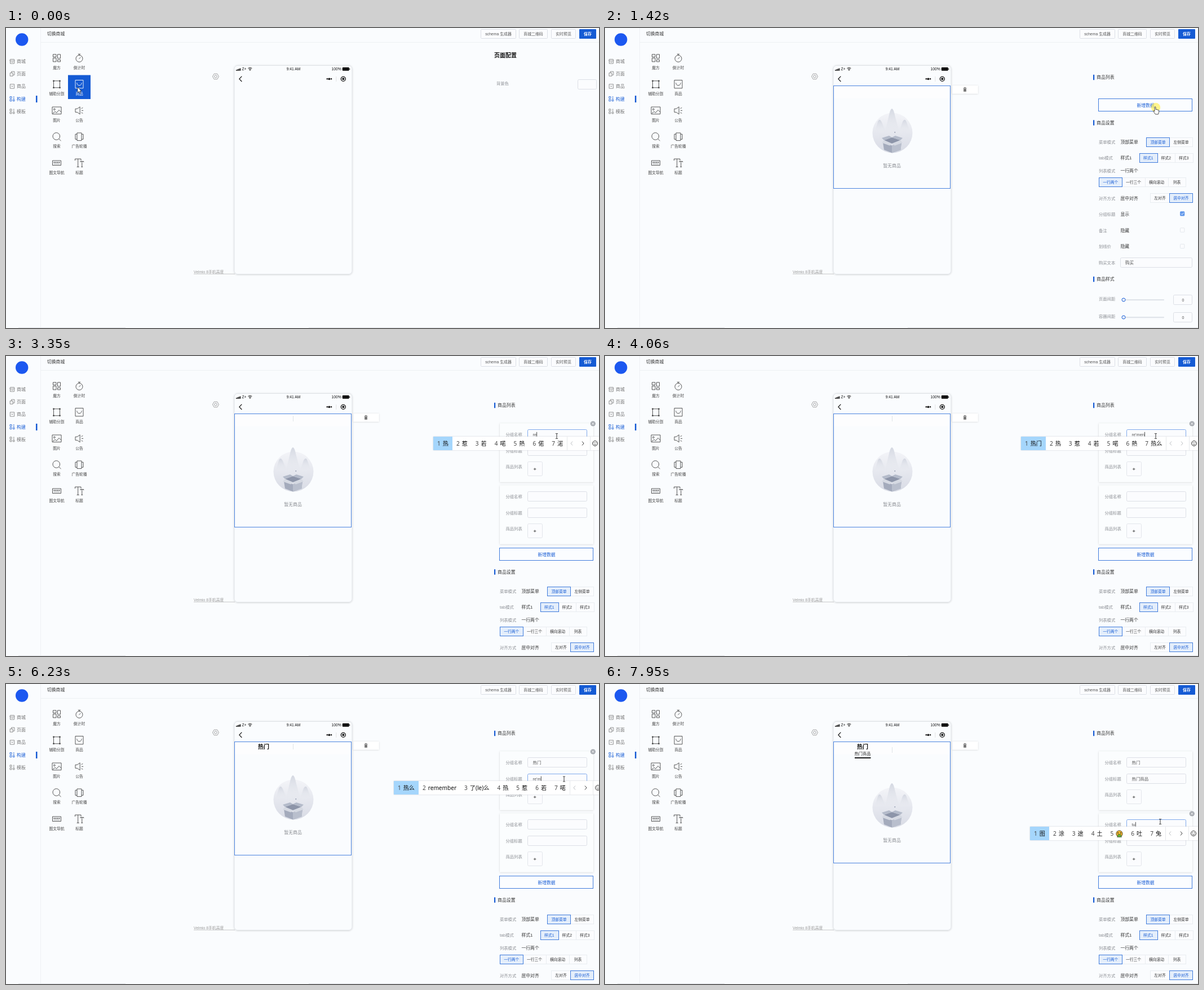
An HTML page that plays this animation: 1052 px wide and 532 px high, repeating every 8 s.

```html
<!DOCTYPE html>
<html lang="zh-CN">
<head>
<meta charset="utf-8">
<style>
html, body { margin: 0; width: 100%; height: 100%; overflow: hidden; background: #fafcfe; }
body { position: relative; font-family: "Liberation Sans", "Noto Sans CJK SC", "Noto Sans CJK", sans-serif; }
#stage { position: absolute; left: 0; top: 0; display: block; }
#ime { position: absolute; display: flex; height: 24px; background: #fff; font-size: 10.1px; line-height: 24px; overflow: hidden;
  white-space: pre; color: #111; box-shadow: 0 0 2px #c4c8ce; font-family: "Noto Sans", "Noto Sans CJK SC", "Noto Sans CJK", sans-serif; }
#ime span { padding: 0 7px; flex: none; }
#ime span:first-child { background: #a5d6fc; }
#ime i { font-style: normal; color: #444; margin-right: 4px; }
#ime svg { flex: none; display: block; }
#ime .face { display: inline-block; vertical-align: -2.5px; }
</style>
</head>
<body>
<svg id="stage" width="1052" height="532" viewBox="0 0 1052 532"></svg>
<div id="ime"></div>
<script>
const LOOP = 8000, BLUE = '#155bd4', DARK = '#333', GREY = '#8c8f94', EDGE = '#dcdfe6';

// y is the vertical middle of the glyphs
const text = (x, y, s, size = 7.3, fill = DARK, extra = '') =>
  `<text x="${x}" y="${y + size * .37}" font-size="${size}" fill="${fill}" ${extra}>${s}</text>`;
const mid = (x, y, s, size, fill, extra = '') => text(x, y, s, size, fill, 'text-anchor="middle" ' + extra);
const box = (x, y, w, h, fill = 'none', stroke = 'none', extra = '') =>
  `<rect x="${x}" y="${y}" width="${w}" height="${h}" fill="${fill}" stroke="${stroke}" ${extra}/>`;
const path = (d, stroke = '#444', w = .9, fill = 'none', extra = '') =>
  `<path d="${d}" stroke="${stroke}" stroke-width="${w}" fill="${fill}" ${extra}/>`;
const dot = (x, y, r, fill, extra = '') => `<circle cx="${x}" cy="${y}" r="${r}" fill="${fill}" ${extra}/>`;
const group = (id, body, extra = '') => `<g id="${id}" ${extra}>${body}</g>`;
const at = (x, y, body) => `<g transform="translate(${x} ${y})">${body}</g>`;
const snap = v => Math.round(v - .5) + .5;

function header() {
  const buttons = [[842, 63, 'schema 生成器'], [910, 51, '商城二维码'], [967, 44, '实时预览']];
  return path('M61.5 0V532M62 25.5H1052', '#eef1f4', 1) + path('M22 531.5H212M537 531.5H1052', '#e2e5e9', 1) +
    dot(28.2, 20.5, 11.2, '#1c58f0') + text(73, 10.5, '切换商城', 7.8) +
    buttons.map(([x, w, s]) => box(x + .5, 2.5, w - 1, 16, '#fbfcfe', EDGE, 'rx="1"') + mid(x + w / 2, 10.5, s, 6.9, '#555')).join('') +
    box(1017, 2, 30, 17, BLUE, 'none', 'rx="1"') + mid(1032, 10.5, '保存', 6.9, '#fff', 'font-weight="bold"');
}

function sidebar() {
  const tiles = 'M-4-4h3v3h-3zM-4 1h3v3h-3zM1.5-3.5H4M1.5-1H4M1.5 1.2H4V4H1.5z';
  const icons = ['M-3.5-3.5h7l.7 2.6h-8.4zM-3.5-1V4h7V-1M-1.5 1.5h3', 'M-3.8-1.5h5V4h-5zM-1.5-1.5V-4H4V2H1.2',
    'M-3.7-3.7h7.4v7.4h-7.4zM-1.8-1q1.8 3 3.6 0', tiles, tiles];
  return ['商城', '页面', '商品', '构建', '模板'].map((s, i) => {
    const y = 59 + i * 22.2, c = i === 3 ? BLUE : '#777';
    return at(11, y, path(icons[i], c, .8)) + text(19, y, s, 8, c);
  }).join('') + box(53, 120, 2.5, 12, BLUE);
}

const corners = [-5.5, 5.5].flatMap(x => [-6, 6].map(y => box(x - 1.2, y - 1.2, 2.4, 2.4, 'currentColor'))).join('');
const modules = [
  ['魔方', 'M-6.5-6.5h5.5v4.5h-5.5zM1.5-6.5h5v7h-5zM-6.5 0h5.5v6.5h-5.5zM1.5 3h5v3.5h-5z'],
  ['倒计时', 'M-6 1a6 6 0 1 0 12 0a6 6 0 1 0-12 0M0-5V-7M-2.2-7h4.4M-.5 1.5l3-3'],
  ['辅助分割', 'M-5.5-6h11v12h-11z', corners],
  ['商品', 'M-7-7.3H7V7H-7zM-4.2-2.5q.5 4.5 4.2 4.5t4.2-4.5'],
  ['图片', 'M-8-6.3H8V6.3H-8zM-5.5-2a1.4 1.4 0 1 0 2.8 0a1.4 1.4 0 1 0-2.8 0M-7 5l4-3 3 2 4-5 4 4'],
  ['公告', 'M-7-3h3.2l5-3.5v13l-5-3.5H-7zM4 0h3.2M3.7-3.5l2.6-1.5M3.7 3.5l2.6 1.5'],
  ['搜索', 'M-7-.8a6.3 6.3 0 1 0 12.6 0a6.3 6.3 0 1 0-12.6 0M4 4l3.5 3.3'],
  ['广告轮播', 'M-4-6.8h8V6.8h-8zM-4-4.5h-3v9h3M4-4.5h3v9h-3'],
  ['图文导航', 'M-7.5-4.2H7.5V4.2H-7.5z', [-4.5, -1.5, 1.5, 4.5].map(x => dot(x, -1, 1.1, 'currentColor')).join('') +
    path('M-5.5 1.8h11', 'currentColor', .5)],
  ['标题', 'M-7.5-4.2v-3h10.5v3M-2.3-7v14M-4.4 7h4.2M2-1.2v-1.6h5.7v1.6M4.8-2.8V7M3.3 7h3']
];
const module = i => {
  const [name, d, more = ''] = modules[i], x = 90 + i % 2 * 40, y = 53.3 + (i >> 1) * 46.5;
  return at(x, y, path(d, 'currentColor', .9) + more) + mid(x, y + 16.8, name, 6.8, 'currentColor');
};

function phone() {
  const bars = [0, 1, 2, 3].map(i => box(408 + i * 2.2, 74.2 - i * .9, 1.7, 1.6 + i * .9, '#111')).join('');
  return at(372, 86, path('M-5.5 0l2.7-4.8h5.6L5.5 0 2.8 4.8h-5.6z', '#999') + dot(0, 0, 2.3, 'none', 'stroke="#999" stroke-width=".9"')) +
    text(333, 432, 'Velmio 8手机高度', 6.8, '#999') + path('M333 436.2H406', '#bbb', .8) +
    box(405, 66.5, 209, 370, '#fafcfe', '#dfe3e7', 'rx="6" filter="url(#soft)"') +
    bars + text(418.5, 72.8, 'Z+', 6.7, '#111') +
    path('M429.6 71.6q3.3-2.8 6.6 0M430.9 73.3q2-1.7 4 0', '#111', 1.1) + dot(432.9, 74.8, .9, '#111') +
    mid(510, 72.8, '9:41 AM', 6.7, '#111') + text(577.5, 72.8, '100%', 6.7, '#111') +
    box(597, 70, 11.5, 5.5, '#111', '#111', 'rx="1" stroke-width=".6"') + box(609.2, 71.7, 1, 2.2, '#111') +
    path('M418.3 85.6l-4.4 4.7 4.4 4.7', '#111', 1.2) +
    dot(569.8, 90.3, 1.2, '#111') + dot(573.3, 90.3, 1.9, '#111') + dot(577, 90.3, 1.2, '#111') +
    path('M585.8 86V95', '#ddd', .8) + dot(598.3, 90.3, 4, 'none', 'stroke="#111" stroke-width="1.3"') + dot(598.3, 90.3, 2, '#111');
}

// a pale disc with three fading peaks and an open carton
function empty() {
  return dot(510, 186, 35.5, 'url(#disc)') +
    path('M478 186l6-20q3-7 7 1l8 19zM521 186l7-20q4-7 7 1l7 19z', 'none', 0, 'url(#hill)') +
    path('M495 192l8-34q6-30 12 0l9 34z', 'none', 0, 'url(#hill)') +
    path('M493 203l16 5.5v13l-14-5.5zM509 208.5l17-5.5-1.5 13-15.5 5.5z', 'none', 0, '#a4abbc') +
    path('M509 208.5l16-5v12.5l-16 5.5z', 'none', 0, '#b9bfcd') +
    path('M495 199l14-5 15 5-15 6z', 'none', 0, '#8d95a9') +
    path('M495 199l-4 4.5 14 5 4-3.5zM524 199l4 4.5-14 5-5-3.5z', 'none', 0, '#d5d9e2') +
    path('M495 199l-4-4 13-4 5 3zM524 199l4-4-13-4-6 3z', 'none', 0, '#b4bbca') + dot(514.3, 185, .9, '#8d96aa') +
    mid(509, 244, '暂无商品', 7.9, '#888b90');
}

const component = () =>
  box(406, 103, 207, 22, '#fff', 'none', 'opacity=".6"') + group('empty', empty()) +
  box(405.5, 102.5, 207, 182, 'none', '#4a82de', 'id="frame"') +
  path('M509.5 106V116', '#d9dce1', .8, 'none', 'id="split"') +
  group('hot', mid(457, 110.8, '热门', 10, '#111', 'font-weight="bold"')) +
  group('sub', mid(457, 123.6, '热门商品', 7.2, '#222') + box(443, 130, 28.5, 1.9, '#111')) +
  box(616, 102, 45.5, 14.3, '#fff', 'none', 'filter="url(#soft)"') +
  path('M635.5 106.8h6M637.5 106.5v-1.2h2v1.2', '#777', 1) + box(636.1, 107.6, 4.8, 5.2, '#777');

const section = (y, s) => box(866, y - 4.7, 2.2, 9.4, BLUE) + text(872, y, s, 7.9);
const label = (y, s, x = 876) => text(x, y, s, 7.3, GREY);
const input = (x, y, w, extra = '') => box(x, snap(y - 8.5), w, 17, '#fbfcfe', EDGE, 'rx="2" ' + extra);

function options(y, on, xs, names) {
  const one = i => box(snap(xs[i] + .5), snap(y - 8), Math.round(xs[i + 1] - xs[i]), 16, i === on ? '#e4eefb' : '#fbfcfe', i === on ? '#3f7bdc' : '#e9edf1') +
    mid((xs[i] + xs[i + 1]) / 2 + .5, y, names[i], 6.8, i === on ? BLUE : DARK);
  return names.map((_, i) => i === on ? '' : one(i)).join('') + one(on);
}

function settings() {
  const check = (y, on) => box(1020.5, y - 3.7, 7.4, 7.4, on ? '#6197ea' : '#fbfcfe', on ? '#6197ea' : '#dfe3e9', 'rx="1" stroke-width=".8"') +
    (on ? path(`M1022 ${y}l1.7 1.7 2.8-3.3`, '#fff', 1) : '');
  const slider = (y, s) => label(y - 1, s) + box(920, y - .5, 72, 2.2, '#e0e4ea', 'none', 'rx="1"') +
    dot(920, y + .5, 3, '#fff', `stroke="${BLUE}"`) + input(1008.5, y + .6, 33) + mid(1025.5, y + .5, '0', 7, '#555');
  const row = (y, s, value) => label(y, s) + text(914.5, y, value, 7.8);
  return box(875.5, 125.5, 166, 22, '#fbfdff', '#3f7bdc') + mid(959, 136.8, '新增数据', 7.8, BLUE) +
    section(168, '商品设置') +
    row(202.5, '菜单模式', '顶部菜单') + options(202.5, 0, [960, 1001, 1042], ['顶部菜单', '左侧菜单']) +
    row(230.5, 'tab模式', '样式1') + options(230.5, 0, [947.5, 979, 1010.5, 1042], ['样式1', '样式2', '样式3']) +
    row(253.5, '列表模式', '一行两个') + options(273.8, 0, [876, 916.5, 957.5, 998.5, 1029.5], ['一行两个', '一行三个', '横向滚动', '列表']) +
    row(301.8, '对齐方式', '居中对齐') + options(301.8, 1, [967, 1001, 1042], ['左对齐', '居中对齐']) +
    row(329.8, '分组标题', '显示') + check(329.3, true) +
    row(358.8, '备注', '隐藏') + check(358.3) + row(387.3, '划线价', '隐藏') + check(387) +
    label(416, '购买文本') + input(914.5, 416, 127) + text(923, 416, '购买', 7.5, '#555') +
    section(445.5, '商品样式') + slider(481.5, '页面间距') + slider(512.5, '容器间距');
}

const card = i => {
  const y = i * 110;
  return group('card' + i, box(876, 119.5 + y, 166, 104, '#fbfdfe', 'none', 'filter="url(#soft)"') +
    ['分组名称', '分组标题', '商品列表'].map((s, k) => label(139 + y + k * 28.8, s, 886.5)).join('') +
    [0, 1].map(k => input(925.5, 139 + y + k * 28.8, 105, `id="in${i * 2 + k}"`)).join('') +
    box(925.5, 187.5 + y, 26, 25, '#fbfcfe', '#e3e6eb', 'rx="2"') + path(`M936 ${200.5 + y}h4.4M938.2 ${198.3 + y}v4.4`, '#333', .8) +
    group('close' + i, dot(1041.3, 120 + y, 4.6, '#a9adb3') + path(`M1039.4 ${118.1 + y}l3.8 3.8m0-3.8l-3.8 3.8`, '#fff', .9)));
};

const FIELD_Y = [139, 167.8, 249];
const stage = document.getElementById('stage');
stage.innerHTML = `<defs>
  <filter id="soft" x="-10%" y="-10%" width="120%" height="125%"><feDropShadow dx="0" dy=".6" stdDeviation="1.5" flood-color="#000" flood-opacity=".17"/></filter>
  <linearGradient id="disc" x2="0" y2="1"><stop offset="0" stop-color="#f3f4f8"/><stop offset="1" stop-color="#d8dbe5"/></linearGradient>
  <linearGradient id="hill" x2="0" y2="1"><stop offset="0" stop-color="#d3d7e1"/><stop offset="1" stop-color="#e9ebf0" stop-opacity="0"/></linearGradient></defs>` +
  header() + sidebar() + box(110, 83.5, 40, 42.5, BLUE, 'none', 'id="hover"') +
  modules.map((_, i) => group('mod' + i, module(i), 'color="#444"')).join('') + phone() +
  group('intro', mid(886, 47.8, '页面配置', 10, '#111', 'font-weight="bold"') + text(870, 98, '背景色', 7.3, GREY) +
    box(1014.5, 91.5, 33, 17, '#fbfcfe', EDGE, 'rx="2"')) +
  group('comp', component()) +
  group('panel', section(87.5, '商品列表') + card(0) + card(1) + group('below', settings())) +
  FIELD_Y.map((y, i) => text(934.5, y, '', 7.4, '#555', `id="val${i}"`)).join('') +
  box(0, 0, .8, 8.5, '#222', 'none', 'id="caret"');

const cursorLayer = document.createElementNS('http://www.w3.org/2000/svg', 'svg');
cursorLayer.setAttribute('style', 'position:absolute;left:0;top:0');
cursorLayer.setAttribute('width', 1052);
cursorLayer.setAttribute('height', 532);
cursorLayer.innerHTML = group('cursor', dot(1, 1.5, 8.2, '#fff04d', 'id="glow" opacity=".65"') +
  group('arrow', path('M0 0v9.5l2.3-2 1.6 3.6 1.6-.7-1.6-3.5h3z', '#222', .7, '#fff')) +
  group('hand', path('M-1 .8q1-1.4 2 0v4.3q1.3-.7 2 .3 1.3-.5 1.9.5 1.7-.3 1.7 1.4v3l-1.3 3.2H.5l-3.6-5q-.6-1.7 1-1.2l1.1 1.2z', '#222', .8, '#fff')) +
  group('beam', path('M-2-4.5h1.4L0-4l.6-.5H2M-2 4.5h1.4L0 4l.6.5H2M0-4V4', '#222', .9)));
document.body.append(cursorLayer);

const el = id => document.getElementById(id);
const show = (id, on) => { el(id).style.display = on ? '' : 'none'; };

// start, end, steps, destination
const moves = [
  [60, 850, 11, 740, 133], [940, 1250, 5, 976, 139.5], [1560, 1950, 6, 978, 240], [2270, 2420, 3, 977, 143],
  [3350, 3350, 1, 977, 142], [4680, 5080, 5, 990, 168.5], [7110, 7600, 7, 985, 244]
];
function pointer(t) {
  let x = 127, y = 105;
  for (const [a, b, n, tx, ty] of moves) {
    if (t < a) break;
    const k = n > 1 ? Math.min(n, Math.floor((t - a) / ((b - a) / (n - 1)) + 1e-6) + 1) / n : 1;
    x += (tx - x) * k;
    y += (ty - y) * k;
  }
  return [x, y];
}

// time, field, typed letters, left edge, candidates, next page available
const RE = '热 惹 若 喏 熱 偌 渃', REM = '热么 remember 了(le)么 热 惹 若 喏';
const REME = '热么 remember 热么么 热 惹 若 喏', MEN = '热门 热 惹 若 喏 熱 热么';
const SHOP = '热门商品 热门 热 惹 若 喏 熱', MENS = '热门是 热门 热 惹 若 喏 熱', R = '人 日 让 如 然 入 仁';
const typing = [
  [3220, 0, 'r', 758, R, 1], [3290, 0, 're', 758, RE, 1],
  [3830, 0, "re'm", 688, REM, 1], [3980, 0, "re'me", 683, REME, 1],
  [4060, 0, "re'men", 738, MEN, 0], [4210, 0, '热门'],
  [5540, 1, 'r', 776, R, 1], [5610, 1, 're', 776, RE, 1],
  [5780, 1, "re'm", 688, REM, 1], [6310, 1, "re'me", 683, REME, 1],
  [6400, 1, "re'men", 738, MEN, 0], [6720, 1, "re'men's", 728, MENS, 0],
  [6800, 1, "re'men'sh", 728, MENS, 0], [6870, 1, "re'men'shang'pin", 718, SHOP, 0],
  [7020, 1, '热门商品'],
  [7870, 2, 't', 758, '他 她 天 听 图 太 头', 1], [7950, 2, 'tu', 754, '图 涂 途 土 * 吐 兔', 1]
];
const sick = `<svg class="face" width="13" height="13" viewBox="-6.5 -6.5 13 13">${dot(0, 0, 5.6, '#f4b92f', 'stroke="#222" stroke-width=".8"') +
  path('M-3.4-2.5l2 1-2 1M3.4-2.5l-2 1 2 1', '#222', .8) + path('M-2 1h4l2 5h-8z', '#222', .5, '#62ad36')}</svg>`;
const ime = el('ime');
let shown = null;
function drawIme(step) {
  if (step === shown) return;
  shown = step;
  ime.style.display = step && step[4] ? 'flex' : 'none';
  if (!step || !step[4]) return;
  const [, field, , left, words, more] = step;
  ime.style.left = left + 'px';
  ime.style.top = [143, 172, 253][field] + 'px';
  ime.style.width = 1052 - left + 'px';
  ime.innerHTML = words.split(' ').map((w, i) => `<span><i>${i + 1}</i>${w === '*' ? sick : w}</span>`).join('') +
    `<svg width="70" height="24">${path('M.5 0V24M41.5 0V24', '#e6e8eb', 1) + path('M10 8.5l-3 3.5 3 3.5', '#b5b8bc', .9) +
    path('M27 8.5l3 3.5-3 3.5', more ? '#222' : '#b5b8bc', .9) + dot(50, 12, 4.5, 'none', 'stroke="#222" stroke-width=".9"') +
    dot(48.4, 10.8, .7, '#222') + dot(51.6, 10.8, .7, '#222') + path('M47.7 13.3q2.3 2.2 4.6 0', '#222', .8)}</svg>`;
}

function render(t) {
  const [x, y] = pointer(t);
  const added = t >= 140, cards = t < 1490 ? 0 : t < 2050 ? 1 : 2;
  const hover = t < 1000 && x < 150;
  show('hover', hover);
  el('mod3').setAttribute('color', hover ? '#fff' : '#444');
  show('intro', !added);
  show('comp', added);
  show('panel', added);

  const hot = t >= 4210, sub = t >= 7020, grow = sub ? 33 : cards ? 19 : 0;
  el('frame').setAttribute('height', 182 + grow);
  el('empty').setAttribute('transform', `translate(0 ${grow})`);
  el('split').setAttribute('transform', `translate(0 ${sub ? 6 : 0})`);
  show('split', cards > 1);
  show('hot', hot);
  show('sub', sub);

  el('below').setAttribute('transform', `translate(0 ${cards ? cards * 110 - 5 : 0})`);
  const over = x < 876 ? -1 : y < 226 ? 0 : 1;
  for (const i of [0, 1]) {
    show('card' + i, cards > i);
    show('close' + i, over === i);
  }

  const focus = t < 2700 ? -1 : t < 5150 ? 0 : t < 7700 ? 1 : 2;
  const values = ['', '', ''];
  let step = null;
  for (const s of typing) if (t >= s[0]) { values[s[1]] = s[2]; step = s; }
  values.forEach((v, i) => {
    const node = el('val' + i);
    if (node.textContent !== v) node.textContent = v;
    el('in' + i).setAttribute('stroke', focus === i ? '#7fa9ec' : EDGE);
  });
  show('caret', focus >= 0);
  if (focus >= 0) {
    const w = values[focus] ? el('val' + focus).getComputedTextLength() : 0;
    el('caret').setAttribute('x', 934.7 + w);
    el('caret').setAttribute('y', FIELD_Y[focus] - 4.2);
  }
  drawIme(step);

  const onButton = x >= 876 && !cards && y > 126;
  const onInput = cards > 0 && x > 926 && x < 1031 && FIELD_Y.some(f => Math.abs(y - f) < 9.5);
  el('cursor').setAttribute('transform', `translate(${x} ${y})`);
  show('hand', onButton);
  show('beam', onInput);
  show('arrow', !onButton && !onInput);
  show('glow', [60, 1420, 2030, 2600, 5110, 7640].some((c, i) => t >= c && t < c + (i < 2 ? 140 : 100)));
}

const start = performance.now();
function frame(now) {
  render(Math.max(0, now - start) % LOOP);
  requestAnimationFrame(frame);
}
render(0);
requestAnimationFrame(frame);
</script>
</body>
</html>
```
